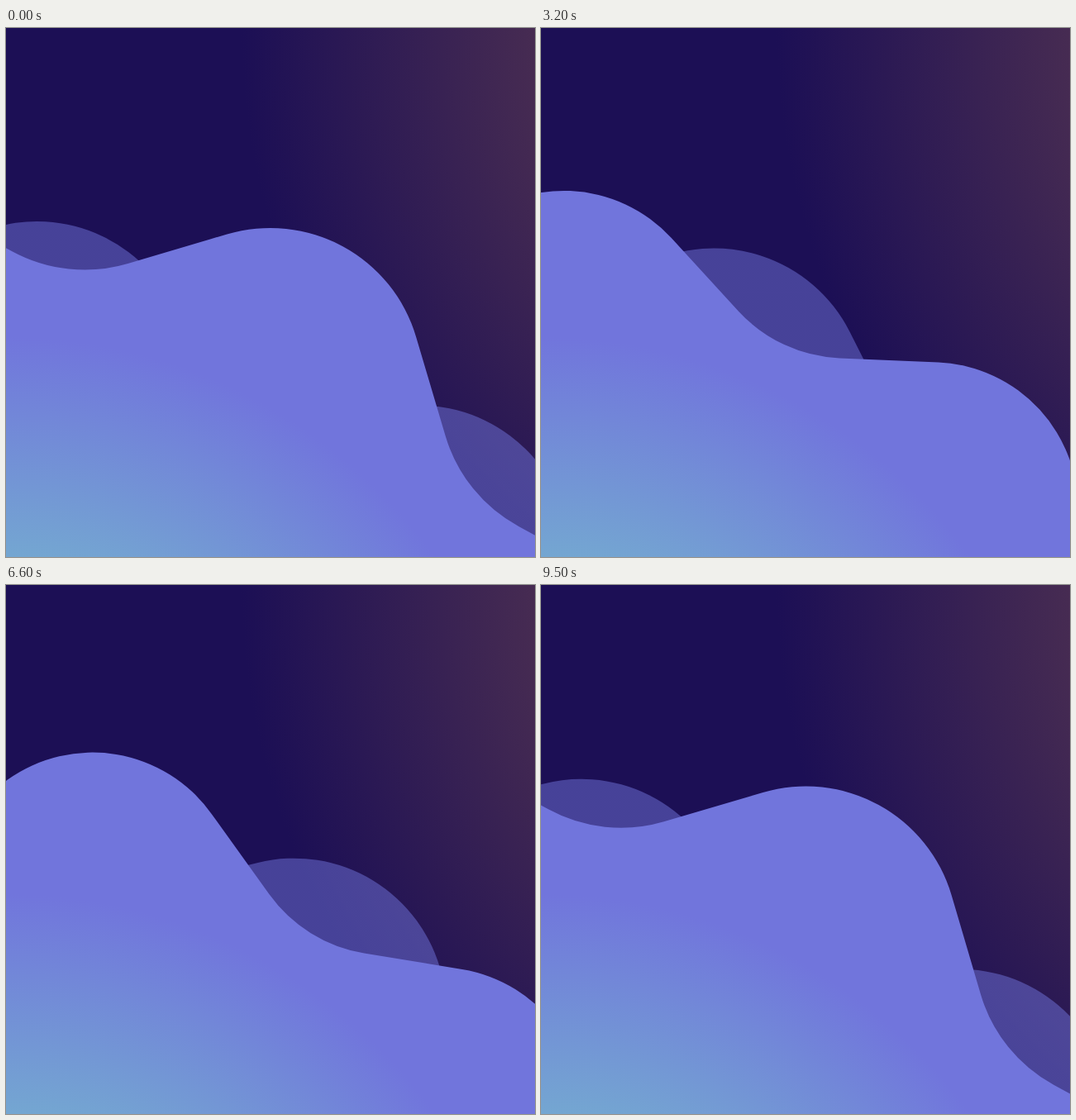
An HTML page for the animation above (9600 ms loop, 640 by 640 pixels).

```html
<!DOCTYPE html>
<html lang="en">
<head>
<meta charset="utf-8">
<title>Rolling waves</title>
<style>
  html, body { margin: 0; width: 100%; height: 100%; overflow: hidden; background: #1c0f55; }
  svg { display: block; width: 100vw; height: 100vh; }
</style>
</head>
<body>
<svg viewBox="0 0 640 640">
  <defs>
    <radialGradient id="dusk" gradientUnits="userSpaceOnUse" cx="1130" cy="0" r="845">
      <stop offset="0" stop-color="#81524e"/>
      <stop offset="1" stop-color="#1c0f55"/>
    </radialGradient>
    <radialGradient id="sea" gradientUnits="userSpaceOnUse" cx="0" cy="1016" r="642">
      <stop offset="0" stop-color="#78ecc2"/>
      <stop offset="1" stop-color="#7175dc"/>
    </radialGradient>
  </defs>
  <rect width="640" height="640" fill="url(#dusk)"/>
  <path id="back" fill="url(#sea)" opacity="0.5"/>
  <path id="front" fill="url(#sea)"/>
</svg>
<script>
const LOOP = 9600, STEP = 100;
const LOBES = 8, TURN = 360 / LOBES;
const LOBE_DIST = 670, ROUND = 184;
const RAD = Math.PI / 180;

const back = document.getElementById("back");
const front = document.getElementById("front");

// Outline of an eight-pointed star with every corner rounded; angles run clockwise from the top.
function star(cx, cy, angle, scale) {
  const d = LOBE_DIST * scale, r = ROUND * scale;
  const flank = d * Math.cos(45 * RAD) + r;
  const valley = (flank + r) / Math.cos(TURN / 2 * RAD);
  const point = (dist, a, off, b) =>
    (cx + dist * Math.sin(a * RAD) + off * Math.sin(b * RAD)).toFixed(2) + " " +
    (cy - dist * Math.cos(a * RAD) - off * Math.cos(b * RAD)).toFixed(2);
  let path = "";
  for (let i = 0; i < LOBES; i++) {
    const a = angle + i * TURN, v = a + TURN / 2;
    path += (i ? "L" : "M") + point(d, a, r, a - 45) +
      `A${r} ${r} 0 0 1 ` + point(d, a, r, a + 45) +
      "L" + point(valley, v, -r, a + 45) +
      `A${r} ${r} 0 0 0 ` + point(valley, v, -r, a);
  }
  return path + "Z";
}

// Cubic easing with flat ends; x1 and x2 are the handle positions in time.
function ease(u, x1, x2) {
  let lo = 0, hi = 1;
  for (let i = 0; i < 30; i++) {
    const s = (lo + hi) / 2, q = 1 - s;
    if (3 * q * q * s * x1 + 3 * q * s * s * x2 + s * s * s < u) lo = s; else hi = s;
  }
  return lo * lo * (3 - 2 * lo);
}

function draw(ms) {
  const u = Math.floor(ms % LOOP / STEP) * STEP / LOOP;
  const shrink = 1 - Math.abs(1 - 2 * u);
  back.setAttribute("d", star(0, 1087, 3.2 - 90 * u, 1));
  front.setAttribute("d", star(0, 1014.7, 28.5 - 90 * ease(u, 0.188, 0.84), 1 - 0.0625 * shrink));
}

const start = performance.now();
function tick() {
  draw(performance.now() - start);
  requestAnimationFrame(tick);
}
tick();
</script>
</body>
</html>
```
